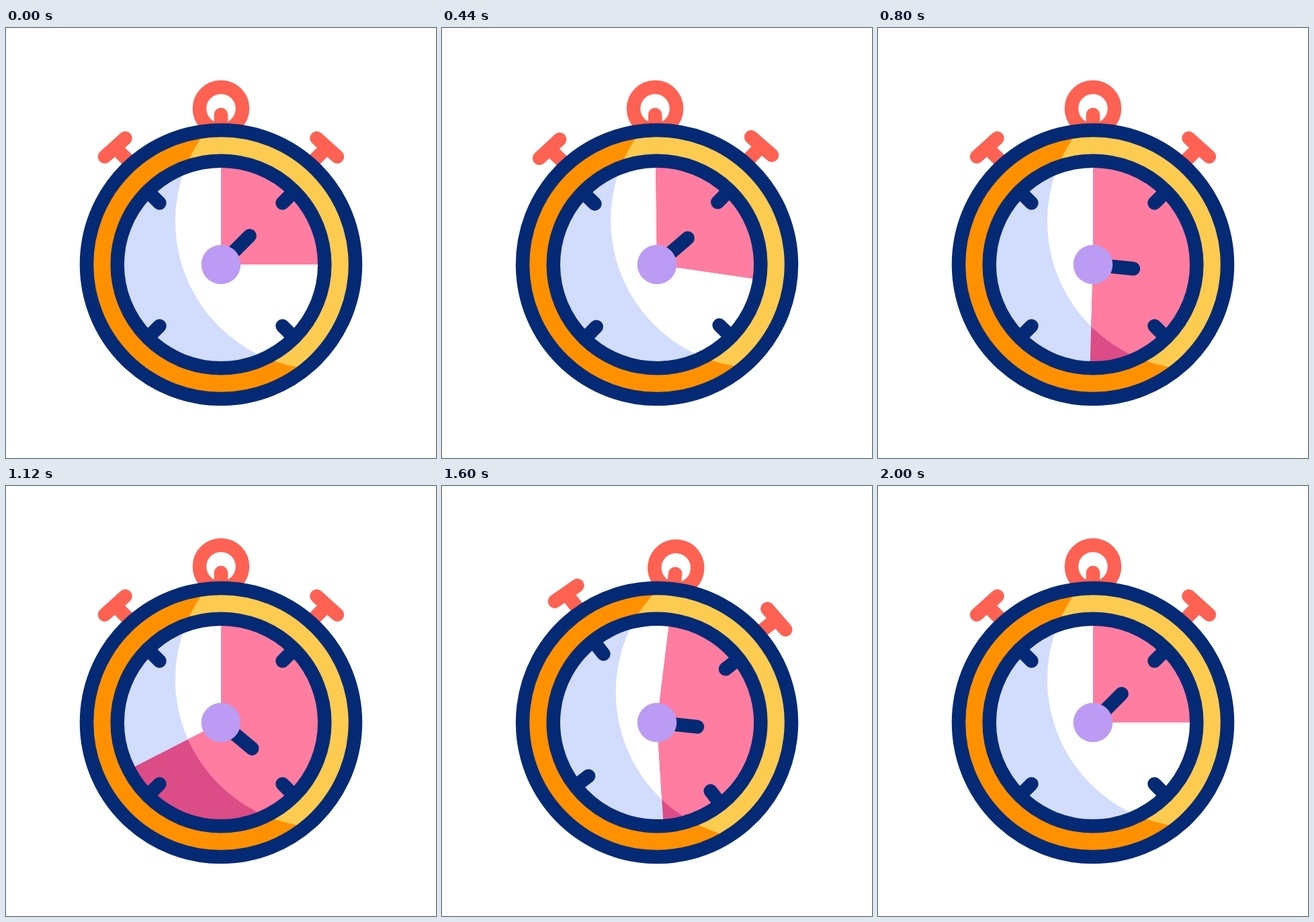
Write an HTML page that moves like this. It is 640 by 640 pixels and loops after 2.08 s.

```html
<!DOCTYPE html>
<html lang="en">
<head>
<meta charset="utf-8">
<title>Stopwatch</title>
<style>
  html, body { margin: 0; width: 100%; height: 100%; overflow: hidden; background: #fff; }
  svg { display: block; width: 100vw; height: 100vh; }
  .line { fill: none; stroke-width: 20.5; stroke-linecap: round; }
  .red { stroke: #ff6152; }
  .navy { stroke: #042a75; }
</style>
</head>
<body>
<svg viewBox="-320 -352 640 640">
  <defs>
    <clipPath id="rim"><circle r="195"/></clipPath>
    <clipPath id="dial"><circle r="150"/></clipPath>
    <clipPath id="light"><circle cx="152" cy="-64" r="220"/></clipPath>
  </defs>
  <g id="body">
    <circle class="line red" cy="-232" r="32"/>
    <path class="line red" d="M0 -223V-195"/>
    <g id="left">
      <path class="line red" d="M-142.5 -188L-173 -160.5M-157.5 -174L-125 -141.5"/>
    </g>
    <g id="right">
      <path class="line red" d="M142.5 -188L173 -160.5M157.5 -174L125 -141.5"/>
    </g>
    <circle r="195" fill="#ff9100"/>
    <g clip-path="url(#rim)"><circle cx="152" cy="-64" r="220" fill="#fdcb50"/></g>
    <circle r="150" fill="#d2dcfd"/>
    <g clip-path="url(#dial)"><circle cx="152" cy="-64" r="220" fill="#fff"/></g>
    <path class="pie" fill="#dc4c87"/>
    <path class="pie" fill="#ff7da1" clip-path="url(#light)"/>
    <circle class="line navy" r="200"/>
    <circle class="line navy" r="154.3"/>
    <path class="line navy" d="M-91.5 -91.5L-108 -108M91.5 -91.5L108 -108M-91.5 91.5L-108 108M91.5 91.5L108 108"/>
    <path id="hand" class="line navy" d="M0 0V-60.3"/>
    <circle r="29.3" fill="#bc9bf4"/>
  </g>
</svg>
<script>
const LOOP = 2080, STEP = 40;

// Keys: [time, value, slope]
const tilt = [[80, 0], [280, -7], [480, 0], [1190, 0], [1360, 2.2, .024], [1600, 7], [2000, 0]];
const sweep = [
  [300, 0], [440, .056, .0008], [800, .566, .0014], [1120, .944, .001],
  [1200, 1], [1360, .957, -.001], [1600, .49, -.0026], [2000, 0]
];
const pressLeft = [[80, 0], [200, 11], [340, 0]];
const pressRight = [[1200, 0], [1350, 11], [1540, 0]];

const byId = id => document.getElementById(id);
const body = byId('body'), left = byId('left'), right = byId('right'), hand = byId('hand');
const pies = document.querySelectorAll('.pie');

function valueAt(keys, t) {
  const next = keys.findIndex(k => k[0] > t);
  if (next === 0) return keys[0][1];
  if (next < 0) return keys[keys.length - 1][1];
  const [t0, a, slopeA = 0] = keys[next - 1];
  const [t1, b, slopeB = 0] = keys[next];
  const span = t1 - t0, u = (t - t0) / span, v = 1 - u;
  return v * v * (1 + 2 * u) * a + u * u * (3 - 2 * u) * b
    + span * u * v * (v * slopeA - u * slopeB);
}

function sector(degrees, r = 150) {
  const a = degrees * Math.PI / 180;
  return `M0 0V${-r}A${r} ${r} 0 ${degrees > 180 ? 1 : 0} 1 ${r * Math.sin(a)} ${-r * Math.cos(a)}Z`;
}

function push(button, side, depth) {
  const d = depth * Math.SQRT1_2;
  button.setAttribute('transform', `translate(${side * d} ${d})`);
}

function draw(t) {
  const p = valueAt(sweep, t);
  body.setAttribute('transform', `rotate(${valueAt(tilt, t)})`);
  hand.setAttribute('transform', `rotate(${45 + 90 * p})`);
  for (const pie of pies) pie.setAttribute('d', sector(90 + 162 * p));
  push(left, 1, valueAt(pressLeft, t));
  push(right, -1, valueAt(pressRight, t));
}

const start = performance.now();
function tick() {
  const t = (performance.now() - start) % LOOP;
  draw(Math.floor(t / STEP) * STEP);
  requestAnimationFrame(tick);
}
tick();
</script>
</body>
</html>
```
